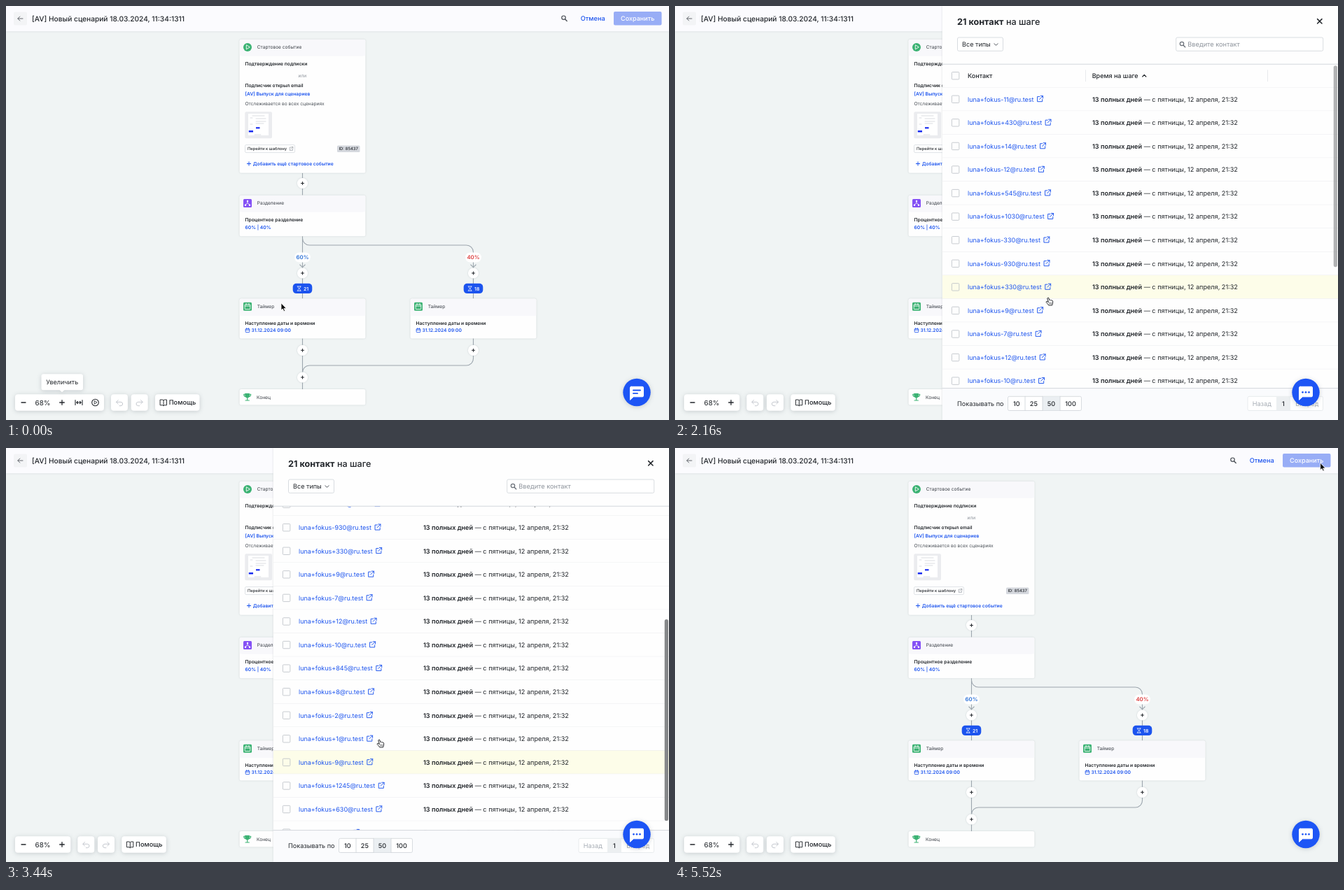
Write an HTML page that moves like this. It is 947x592 px and loops after 6 s.

```html
<!DOCTYPE html>
<html lang="ru">
<head>
<meta charset="utf-8">
<title>Сценарий</title>
<style>
html, body { margin: 0; width: 100%; height: 100%; overflow: hidden; background: #f0f4f4 }
svg { display: block; width: 947px; height: 592px; font-family: Inter, "Open Sans", sans-serif; text-rendering: geometricPrecision }
text { white-space: pre }
.soft { filter: drop-shadow(0 .5px 1.2px rgba(30, 45, 60, .17)) }
.lift { filter: drop-shadow(0 1px 3px rgba(30, 45, 60, .2)) }
</style>
</head>
<body>
<svg id="stage" viewBox="0 0 947 592"></svg>
<script>
const BLUE = '#1c54ee', INK = '#22262b', GREY = '#a6acb4', LINE = '#9da6ae', GREEN = '#3bb273';
const ROW = 33.57, TOP = 116.8, MAX_SCROLL = 274.4, LOOP = 6000;

// drawing helpers
const text = (x, y, s, size = 9.1, fill = INK, weight = 400, anchor = 'start') =>
  `<text x="${x}" y="${y}" font-size="${size}" fill="${fill}" font-weight="${weight}" text-anchor="${anchor}">${s}</text>`;
const rect = (x, y, w, h, fill, r = 0, more = '') =>
  `<rect x="${x}" y="${y}" width="${w}" height="${h}" rx="${r}" fill="${fill}" ${more}/>`;
const path = (d, stroke = INK, width = 1, fill = 'none') =>
  `<path d="${d}" stroke="${stroke}" stroke-width="${width}" fill="${fill}" stroke-linecap="round" stroke-linejoin="round"/>`;
const circle = (x, y, r, fill, more = '') => `<circle cx="${x}" cy="${y}" r="${r}" fill="${fill}" ${more}/>`;
const group = (x, y, body, scale = '1') => `<g transform="translate(${x} ${y}) scale(${scale})">${body}</g>`;
const outline = c => `stroke="${c}" stroke-width=".8"`;
const bold = (x, y, s, fill = INK, size = 6.72) => text(x, y, s, size, fill, 600);
const plus = (x, y, r, c = INK, w = 1) => path(`M${x - r} ${y}h${2 * r}M${x} ${y - r}v${2 * r}`, c, w);
const lens = (x, y, c) => circle(x - 1, y - 1, 2.7, 'none', `stroke="${c}" stroke-width="1.2"`) +
  path(`M${x + 1.2} ${y + 1.2}l2.5 2.5`, c, 1.4);
const linkIcon = (c, w) => path('M4 1.5H.8V8.6H7.9V5.4M5.4 .5H8.7V3.8M8.7 .5L3.8 5.4', c, w);

// flow chart
const card = (x, y, h, head, title, icon) =>
  `<g class="soft">${rect(x, y, 180, h, '#fefefe', 2.5)}</g>` +
  rect(x + .3, y + .3, 179.4, head, '#f8f8fb', 2.5) + text(x + 25.3, y + 13.3, title, 6.62, '#3a3f46') + icon(x + 11.5, y + 11.3);
const addButton = (x, y) => `<g class="soft">${circle(x, y, 7.6, '#fff')}</g>` + plus(x, y, 2);
const playIcon = (x, y) => circle(x, y, 6, GREEN) + path(`M${x - 1.7} ${y - 2.9}v5.8l4.7 -2.9z`, '#fff', .9);
const splitIcon = (x, y) => rect(x - 6, y - 6, 12, 12, '#8450f5', 1.5) +
  path(`M${x} ${y - 3}v2.6l-3 2.6M${x} ${y - .4}l3 2.6`, '#fff', .8) +
  [[0, -3], [-3, 2.7], [3, 2.7]].map(p => circle(x + p[0], y + p[1], 1.2, '#fff')).join('');
const calendar = (x, y, r, c) => rect(x - r, y - r * .8, 2 * r, r * 1.8, 'none', .7, outline(c)) +
  path(`M${x - r} ${y - r * .2}h${2 * r}M${x - r * .5} ${y - r * 1.15}v${r * .5}M${x + r * .5} ${y - r * 1.15}v${r * .5}`, c, .8);
const timerIcon = (x, y) => rect(x - 6, y - 6, 12, 12, GREEN, 1.5) + calendar(x, y, 3.8, '#fff');

function timerBranch(dx, share, color, count) {
  const x = 423.5 + dx;
  return rect(x - 11.5, 352.5, 23, 14, '#fff', 7) + text(x, 362.3, share, 7.8, color, 600, 'middle') +
    path(`M${x - 3.7} 370l3.7 3.7l3.7 -3.7`, LINE, 1.1) + addButton(x, 382) +
    rect(x - 13.8, 396.7, 27.6, 14.4, BLUE, 5) +
    path(`M${x - 7.3} 401h5M${x - 7.3} 407.2h5M${x - 6.7} 401q0 2 1.9 3.1q1.9 -1.1 1.9 -3.1M${x - 6.7} 407.2q0 -2 1.9 -3.1q1.9 1.1 1.9 3.1`, '#fff', .7) +
    bold(x + 1.5, 406.6, count, '#fff', 6.9) +
    card(333.5 + dx, 418.5, 57, 24.5, 'Таймер', timerIcon) +
    bold(341.5 + dx, 455.6, 'Наступление даты и времени') +
    calendar(345 + dx, 463.8, 2.8, BLUE) + bold(350.5 + dx, 466.4, '31.12.2024 09:00', BLUE) + addButton(x, 492.3);
}

const thumbnail = rect(341.3, 151.3, 38.7, 38, '#ebecef', 2) + rect(346, 154, 29, 31, '#fff') +
  path('M352 157h17M357 161h14M357 165h14M357 168h11M349 160h3M349 169h3M355 184h9', '#c3c6ce', .6) +
  rect(357, 173.2, 5.5, 2.2, '#1a2df0') + rect(346.8, 178, 6.2, 2.5, '#1a2df0');

const flow =
  path('M423.5 239V270M423.5 329V418M423.5 332a10 10 0 0 0 10 10H657.5a10 10 0 0 1 10 10V418' +
    'M423.5 475V548M667.5 475V504a10 10 0 0 1 -10 10H433.5a10 10 0 0 0 -10 10', LINE, 1.1) +
  card(333.5, 47.7, 191, 23.5, 'Стартовое событие', playIcon) +
  bold(341.5, 84.5, 'Подтверждение подписки') + text(423.3, 101.6, 'или', 6.62, '#8d939b', 400, 'middle') +
  bold(341.5, 116.3, 'Подписчик открыл email') + bold(341.5, 127.7, '[AV] Выпуск для сценариев', BLUE) +
  text(341.5, 142.1, 'Отслеживается во всех сценариях', 6.65, '#4b5158') + thumbnail +
  rect(341.5, 198.6, 71, 11, '#fff', 1.5, outline('#d9dce1')) + text(345, 206.2, 'Перейти к шаблону', 5.8, INK, 500) +
  group(404.7, 201.2, linkIcon('#8d939b', 1.1), .6) +
  rect(473, 199.5, 32.5, 9.5, '#d5d8de', 1.5) + text(489.2, 206.4, 'ID: 85437', 5.9, INK, 500, 'middle') +
  plus(347, 225.5, 2.6, BLUE) + bold(352.7, 228, 'Добавить ещё стартовое событие', BLUE) + addButton(423.5, 253.5) +
  card(333.5, 270.7, 58.5, 23.5, 'Разделение', splitIcon) +
  bold(341.5, 307.7, 'Процентное разделение') + bold(341.5, 319.4, '60% | 40%', BLUE) +
  timerBranch(0, '60%', '#2b70d6', '21') + timerBranch(244, '40%', '#dc3d3d', '18') + addButton(423.5, 531) +
  `<g class="soft">${rect(333.5, 548, 180, 22.5, '#fefefe', 2.5)}</g>` + text(358, 561.5, 'Конец', 6.62, '#3a3f46') +
  path('M342 554.3h5.4v3.5q-.4 2.3 -2.7 2.5q-2.3 -.2 -2.7 -2.5z', GREEN, 1, GREEN) +
  path('M341.8 555.2h-2.1q0 3 2.6 3.4M347.6 555.2h2.1q0 3 -2.6 3.4M344.7 560.5v3M342 564h5.4', GREEN, 1.1);

// page header
const header = `<g class="soft">${rect(0, -4, 947, 40.3, '#fbfbfe')}</g>` +
  rect(11, 8.5, 19, 19, '#f3f4f6', 2) + path('M24 18h-7M19.8 15l-3 3l3 3', '#53585f', .9) +
  text(37, 21.7, '[AV] Новый сценарий 18.03.2024, 11:34:1311', 10.2, INK, 500) + lens(797.5, 17.7, '#4a4f56') +
  text(820.8, 21.2, 'Отмена', 9.2, BLUE, 500) + rect(868, 8, 68.5, 19.5, '#98adf6', 2) +
  text(902.2, 21.2, 'Сохранить', 9.05, '#fff', 500, 'middle');

// bottom tools
const box = (x, w) => `<g class="lift">${rect(x, 555.3, w, 23.5, '#fff', 4)}</g>`;
const curl = path('M157.7 566.3h6.3q2.7 .4 2.7 2.7t-2.7 2.7h-2M160.2 563.5l-2.7 2.8l2.7 2.8', '#c5c9cf');
const tools = `<g class="lift"><rect id="zoomBox" x="13" y="555.3" height="23.5" rx="4" fill="#fff"/></g>` +
  path('M22 567h6', INK, 1.3) + text(52.5, 570.5, '68%', 9.9, INK, 400, 'middle') + plus(80, 567, 3.3, INK, 1.3) +
  `<g id="extras">${path('M99 563.5v7M109 563.5v7M101 567h6M102.5 565.3l-1.7 1.7l1.7 1.7M105.5 565.3l1.7 1.7l-1.7 1.7', INK, 1.1)}
    ${circle(127.5, 567, 4.8, 'none', `stroke="${INK}" stroke-width="1.1"`)}${path('M126.2 564.8v4.4l3.5 -2.2z', INK, .8)}</g>` +
  `<g id="shifted">${box(150, 24)}${box(178.7, 24)}${box(213, 63.5)}${curl}${group(352.7, 0, curl, '-1 1')}
    ${path('M220.5 563h3.2l1.3 1l1.3 -1h3.2v7.8h-3.2l-1.3 1l-1.3 -1h-3.2zM225 564v7.6', INK, .95)}
    ${text(232.7, 570.3, 'Помощь', 9.25, INK, 500)}</g>` +
  `<g id="tip"><g class="lift">${rect(50.5, 526.3, 59.5, 23, '#fff', 3)}${path('M76.5 549h7l-3.5 3.3z', 'none', 0, '#fff')}</g>
    ${text(80.2, 541, 'Увеличить', 9, INK, 400, 'middle')}</g>`;

// contact panel
const suffixes = '-11 +430 +14 -12 +545 +1030 -330 -930 +330 +9 -7 +12 -10 +845 +8 -2 +1 -9 +1245 +630'.split(' ');
const mails = [...suffixes.map(s => `luna+fokus${s}@ru.test`), 'sevlunka@ru.test'];
const checkbox = y => rect(395.4, y - 5.2, 10.4, 10.4, 'none', 1, outline('#b9bec5'));

const rows = mails.map((mail, i) => {
  const y = TOP + ROW * (i + .5), last = i == mails.length - 1;
  const time = last ? ['8', 'со среды, 17 апреля, 23:39'] : ['13', 'с пятницы, 12 апреля, 21:32'];
  return `<g class="row">${rect(382, y - ROW / 2, 565, ROW, '#fefefe')}${checkbox(y)}
    <g class="mail">${text(418, y + 3.3, mail, 9, BLUE)}${group(0, y - 5.2, linkIcon(BLUE, .95))}</g>
    ${text(596, y + 3.3, `<tspan font-weight="600">${time[0]} полных дней</tspan> — ${time[1]}`, 9.15)}
    ${path(`M382 ${y + ROW / 2}H947`, '#e6e8eb', .8)}</g>`;
}).join('');

const sizes = [[487.8, 10], [512.4, 25], [537.4, 50], [565, 100]].map(([x, n]) => text(x, 571.7, n, 9.1, INK, 500, 'middle')).join('');

const panel = `<g id="panel">
  <g class="soft">${rect(381.7, 0, 570, 592, '#fefefe')}</g>
  ${text(403, 27.3, '<tspan font-weight="700">21 контакт</tspan> на шаге', 12.65, INK, 500)}
  ${path('M917.6 18.6l6.4 6.4M924 18.6l-6.4 6.4', INK, 1.5)}
  ${rect(403.5, 45, 65, 19.3, '#fff', 2, outline('#cfd3d9'))}${text(410, 58.2, 'Все типы')}${path('M456 53.8l2.5 2.5l2.5 -2.5', '#4a4f56')}
  ${rect(715.7, 45, 210, 19.3, '#fff', 2, outline('#cfd3d9'))}${lens(725, 55, '#6a7078')}${text(732.3, 58.2, 'Введите контакт', 9.25, '#8e949c')}
  <g clip-path="url(#view)"><g id="list">
    ${checkbox(100)}${text(418, 103.3, 'Контакт', 9, INK, 500)}${text(595.7, 103.3, 'Время на шаге', 9, INK, 500)}
    ${path('M667.8 101.3l2.5 -2.6l2.5 2.6', INK, 1.2)}${path('M586.5 92v16M846.5 92v16', '#e3e5e9', .8)}
    ${path(`M382 ${TOP}H947`, '#e6e8eb', .8)}${rows}</g>
    <rect id="thumb" x="940.7" width="5.3" height="288" rx="2.6" fill="#858789"/></g>
  ${path('M382 83.2H947', '#d3d7dc', 1)}
  ${rect(382, 546.6, 565, 46, '#fafbfd')}${path('M382 546.6H947', '#d3d7dc', 1)}
  ${text(403, 571.7, 'Показывать по')}
  ${rect(475.5, 558.3, 105, 20.2, '#fff', 2, outline('#cfd3d9'))}${rect(525, 558.6, 25, 19.6, '#ebeff2')}
  ${path('M500 558.3v20.2M525 558.3v20.2M550 558.3v20.2', '#cfd3d9', .8)}${sizes}
  ${rect(818, 558.3, 107.5, 20.2, '#fff', 2, outline('#e4e7ea'))}${rect(859, 558.6, 20, 19.6, '#eceff1')}
  ${text(824.7, 571.7, 'Назад', 9.1, GREY)}${text(869, 571.7, '1', 9.1, INK, 500, 'middle')}${text(886.3, 571.7, 'Вперед', 9.1, GREY)}
</g>`;

const chat = `<g class="lift">${circle(901, 552.5, 19.7, '#1d55f5')}</g>` +
  path('M893 544.3H909q1.5 0 1.5 1.5V557.3q0 1.5 -1.5 1.5H896.3L891.5 563.3V545.8q0 -1.5 1.5 -1.5z', '#fff', 1, '#fff') +
  `<g id="lines">${path('M896 549.5h10M896 553.9h6', '#1d55f5', 1.9)}</g>` +
  `<g id="dots">${[-4.5, 0, 4.5].map(d => circle(901 + d, 552.3, 1.35, '#1d55f5')).join('')}</g>`;

const statusBar = `<g id="status">${rect(-3, 579, 263, 16, '#d9dddd', 2)}
  ${text(3, 588.3, 'https://app.sendsay.ru/subscribers/contacts/50249714/automations', 7.7, '#a8adae')}</g>`;

const pointers =
  `<g id="arrow">${path('M0 0V10L2.3 8L3.9 11.6L5.6 10.9L4 7.4H7.2Z', '#fff', .8, '#0b0b0b')}</g>` +
  `<g id="hand">${path('M-1 .7Q0 -.6 1 .7L1.6 3.6Q2.5 2.7 3.3 3.8Q4.4 3 5 4.2Q6.4 3.8 6.7 5.3L6.5 8L5.6 11H.8L-1.2 8.4L-2.9 6.3Q-2.7 4.7 -.9 5.7L.1 6.4Z', '#15171a', .9, '#fff')}
    ${path('M1.7 7v2.3M3.2 7v2.3M4.7 7v2.3', '#15171a', .5)}</g>`;

stage.innerHTML = `<clipPath id="view">${rect(382, 83.2, 565, 463.4, '#000')}</clipPath>` +
  flow + header + tools + panel + chat + statusBar + pointers;

const $ = id => document.getElementById(id);
const rowNodes = [...document.querySelectorAll('.row')];
const mailNodes = [...document.querySelectorAll('.mail')];
for (const m of mailNodes) {
  const y = +m.firstChild.getAttribute('y') - 8.5;
  m.lastElementChild.setAttribute('transform', `translate(${418 + m.firstChild.getComputedTextLength() + 4.2} ${y})`);
}

// motion
const part = (t, a, b) => Math.min(1, Math.max(0, (t - a) / (b - a)));
const smooth = p => p * p * (3 - 2 * p);
const easeOut = p => 1 - (1 - p) ** 2;
const move = (node, x, y) => node.setAttribute('transform', `translate(${x} ${y})`);
const show = (node, alpha) => node.setAttribute('opacity', alpha);

const stops = [
  [40, 600, 430, 400, smooth], [1340, 1880, 533, 417, smooth],
  [4120, 4760, 927, 42, smooth], [4780, 5120, 921.7, 21.5, easeOut]
];
function pointer(t) {
  let x = 393, y = 425;
  for (const [a, b, nx, ny, ease] of stops) {
    const p = ease(part(t, a, b));
    x += (nx - x) * p;
    y += (ny - y) * p;
  }
  return [x, y];
}

function scrollAt(t) {
  if (t < 3200) return MAX_SCROLL * smooth(part(t, 2150, 2680));
  return MAX_SCROLL * (1 - smooth(part(t, 3200, 3600) ** 3.55));
}

function hoverAt(t, y) {
  if (t < 800 || t >= 5320) return -1;
  if (t < 3200) return 8;
  return t < 3600 ? 17 : Math.floor((y - TOP) / ROW);
}

function draw(now) {
  const t = Math.floor(now % LOOP / 40) * 40;
  const [x, y] = pointer(t), scroll = scrollAt(t), hover = hoverAt(t, y);

  const fold = smooth(part(t, 40, 320));
  $('zoomBox').setAttribute('width', 127 - 47.7 * fold);
  show($('extras'), 1 - part(t, 40, 200));
  show($('tip'), 1 - part(t, 40, 200));
  move($('shifted'), -47.7 * fold, 0);

  const open = 1 - (1 - part(t, 660, 960)) ** 3, shut = smooth(part(t, 5290, 5520));
  move($('panel'), 575 * (1 - open + shut), 0);
  move($('list'), 0, -scroll);
  $('thumb').setAttribute('y', 85 + scroll * .628);
  show($('thumb'), part(t, 2110, 2190) * (1 - part(t, 4140, 4360)));
  rowNodes.forEach((r, i) => r.firstElementChild.setAttribute('fill', i == hover ? '#fdfde9' : '#fefefe'));
  show(mailNodes[8], t >= 800 && t < 1600 ? .62 : 1);
  show($('status'), part(t, 920, 1080) * (1 - part(t, 1600, 1760)));

  const turn = 45 * part(t, 1200, 1280) + 135 * part(t, 1360, 1560);
  show($('lines'), t < 1160 ? 1 : 0);
  show($('dots'), t < 1160 ? 0 : 1);
  $('dots').setAttribute('transform', `rotate(${turn} 901 552.3)`);

  const hand = t >= 400 && t < 4760 && (t < 3600 || y > TOP);
  show($('hand'), hand ? 1 : 0);
  show($('arrow'), hand ? 0 : 1);
  move($('hand'), x, y);
  move($('arrow'), x, y);
}

const start = performance.now();
(function tick() {
  draw(performance.now() - start);
  requestAnimationFrame(tick);
})();
</script>
</body>
</html>
```
